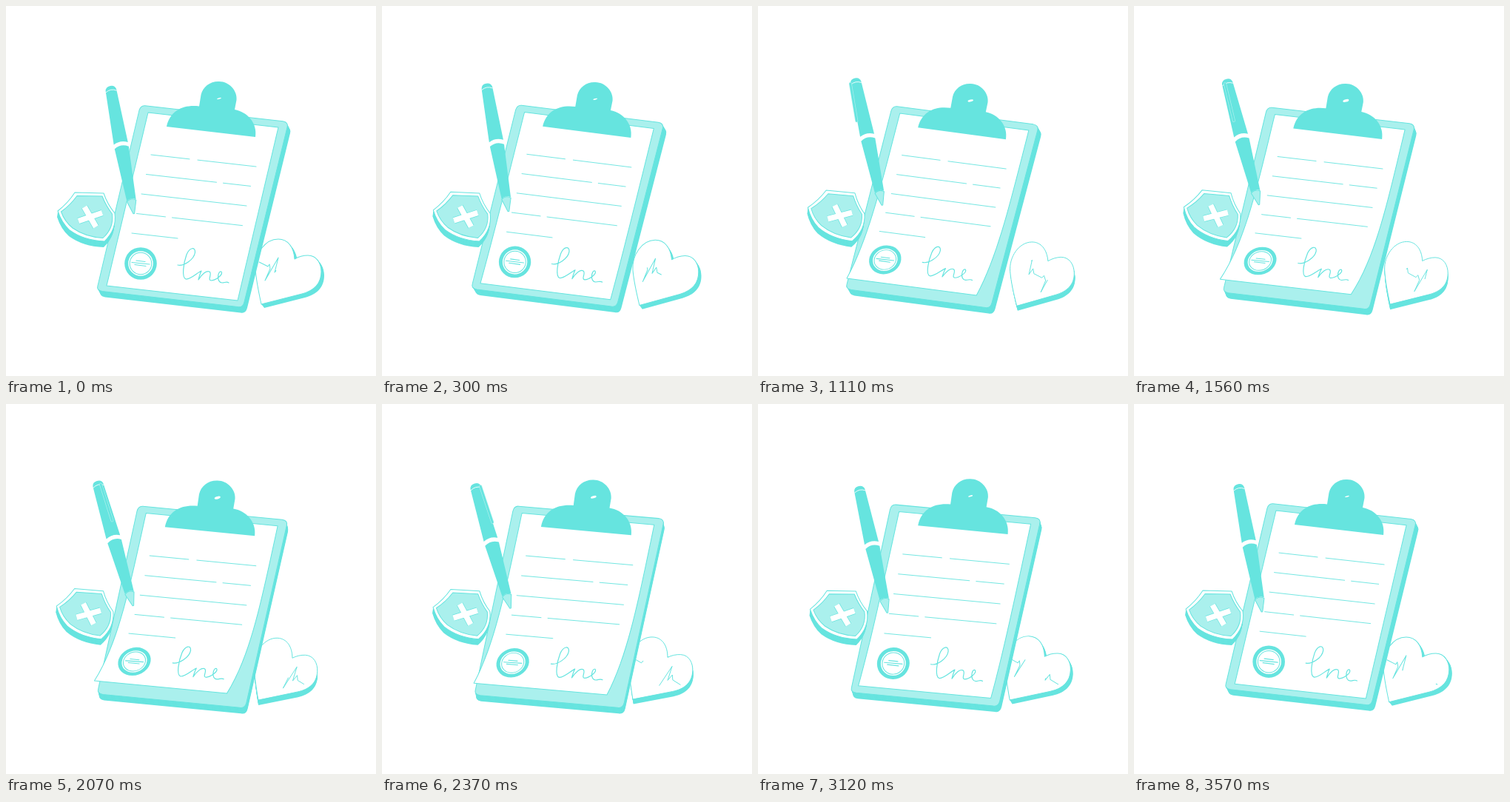
An HTML page with a canvas for the animation above (3.6 s loop, 500x500 px).

```html
<!DOCTYPE html>
<html lang="en">
<head>
<meta charset="utf-8">
<title>Medical form</title>
<style>
  html, body { margin: 0; width: 100%; height: 100%; overflow: hidden; background: #fff; }
  canvas { display: block; width: 500px; height: 500px; }
</style>
</head>
<body>
<canvas id="stage" width="500" height="500"></canvas>
<script>
const ctx = document.getElementById('stage').getContext('2d');
const DARK = '#66e4df', LIGHT = '#aaf0ed', WHITE = '#fff';
const PERIOD = 3600, RAD = Math.PI / 180;
const TRACE = 242; // length of the heartbeat path
const BEAT = 'l-7 16 18-31-5 20 6-8 1 7 11 6';

const ART = {
  heart: 'M345 403C341 385 338 370 337 355C336 335 350 315 368 315C381 315 389 326 390 342C395 339 402 337 408 337C420 337 426 348 426 359C426 376 415 385 400 389Z',
  trace: `M342 346l12 6 2-3 1 6${BEAT}l3-3 2 7${BEAT}`,
  shield: 'M93 252L132 253Q137 268 147 280Q150 302 133 318Q105 317 86 303Q75 293 70 277Q84 266 93 252Z',
  shieldInner: 'M96 256.5L130 257Q135 270 143.5 281Q146 300 131 313.5Q107 312 90 300Q79 291 74.5 278Q87 269 96 256.5Z',
  cross: 'M106 271.5L121.5 298.5M98 290.5L130 279.5',
  board: 'M188 134.7L374 155.7Q382 157 380 164L322 400Q320 408 313 406.5L130 385.5Q122 384 124 378L180 141Q182 134 188 134.7Z',
  sign: 'M232 350C240 352 254 343 255.5 333C256 325 248 326 244 336C240 347 237 367 243 369C249 370 259 360 264 358C262 362 261 366 260 370C265 362 271 357 275 359C279 362 272 370 277 371C283 371 294 363 291 359C286 357 284 374 292 374C296 374 298 372 301 374',
  sealLines: 'M176 344l12 1.5M170 346.5l24 2.5M174 349.5l15 2',
  clip: 'M217 163C222 140 241 133 261 135.5L263.5 120C266 109 276 101.5 288 102C302 102 313 115 311.5 127L309 140C326 143 340 158 337 177Z',
  cap: 'M-7.4 5Q-6.5-1 0-1Q6.5-1 7.4 5L9.7 78Q0 73-9.7 78Z',
  grip: 'M-9.7 84Q0 78 9.7 84L6.3 156Q0 152-6.3 156Z',
  nib: 'M-6.3 157Q0 152 6.3 157L.8 174.5-.8 174.5Z',
  capSeam: 'M-7.2 6.5Q0 2 7.2 6.5'
};
for (const key in ART) ART[key] = new Path2D(ART[key]);

// Written lines as dash, gap, dash.
const ROWS = [[52, 11, 79], [95, 9, 37], [142], [39, 9, 95], [62]];

// How each part sways: pivot, then [amplitude, peak in degrees] of every movement.
const SWAY = {
  board:  { pivot: [182, 134], x: [2.1, 55],  y: [2.1, 220], turn: [1.4, 82],   grow: [0.012, 260] },
  heart:  { pivot: [368, 315], x: [2, 90],    y: [2.7, 118], turn: [2.8, 253],  grow: [0.02, 0] },
  shield: { pivot: [113, 285], x: [2, -40],   y: [1, -30],   turn: [2.5, 145],  grow: [0, 0] },
  pen:    { pivot: [173, 281], x: [3.6, -69], y: [7, -40],   turn: [-3.2, 217], grow: [0, 0] }
};

function sway({ pivot: [px, py], x, y, turn, grow }, angle) {
  const wave = ([amp, peak]) => amp * (Math.cos(angle - peak * RAD) - Math.cos(peak * RAD));
  return new DOMMatrix()
    .translate(px + wave(x), py + wave(y))
    .rotate(wave(turn))
    .scale(1 + wave(grow))
    .translate(-px, -py);
}

function paint(path, fill, stroke, width = 1) {
  if (fill) { ctx.fillStyle = fill; ctx.fill(path); }
  if (stroke) { ctx.strokeStyle = stroke; ctx.lineWidth = width; ctx.stroke(path); }
}

function extrude(path, matrix, dx, dy, face) {
  for (let k = 8; k >= 0; k--) {
    ctx.setTransform(new DOMMatrix().translate(dx * k / 8, dy * k / 8).multiply(matrix));
    paint(path, k ? DARK : face, k ? null : DARK);
  }
}

function ellipse(x, y, rx, ry = rx, tilt = 0) {
  const p = new Path2D();
  p.ellipse(x, y, rx, ry, tilt, 0, 7);
  return p;
}

function drawHeart(angle) {
  const c = Math.cos(angle);
  extrude(ART.heart, sway(SWAY.heart, angle), 2 + 2 * c, 6.2 - 1.2 * c, WHITE);
  ctx.setLineDash([100, TRACE - 100]);
  ctx.lineDashOffset = -TRACE * angle / (2 * Math.PI);
  paint(ART.trace, null, DARK);
  ctx.setLineDash([]);
}

function drawBoard(angle) {
  const matrix = sway(SWAY.board, angle);
  const curl = (1 - Math.cos(angle)) / 2;
  extrude(ART.board, matrix, 3.2 + 1.85 * Math.cos(angle - 65 * RAD), 8, LIGHT);

  // The sheet lifts more and more towards its lower edge.
  const bend = (x, y) => {
    const v = (176 * (y - 144) - 20 * (x - 192)) / 42304;
    const lift = curl * v ** 4;
    return [x - 18 * lift, y - 11.5 * lift];
  };
  const sheet = new Path2D();
  for (let i = 0; i <= 20; i++) sheet.lineTo(...bend(192 - 2.8 * i, 144 + 11.7 * i));
  for (let i = 20; i >= 0; i--) sheet.lineTo(...bend(368 - 2.75 * i, 164 + 11.7 * i));
  sheet.closePath();
  paint(sheet, WHITE, DARK);

  const writing = new Path2D();
  ROWS.forEach((row, r) => {
    let x = 196 - 6.5 * r;
    const point = () => bend(x, 201 + 26.5 * r + 0.113 * (x - 196 + 6.5 * r));
    row.forEach((length, i) => {
      if (i % 2 === 0) writing.moveTo(...point());
      x += length;
      if (i % 2 === 0) writing.lineTo(...point());
    });
  });
  paint(writing, null, DARK, 0.9);

  // Fixes a drawing to the sheet and foreshortens it as the sheet lifts.
  const pin = (x, y, amount) => {
    const s = amount * curl;
    ctx.setTransform(matrix.translate(...bend(x, y))
      .multiply(new DOMMatrix([1, 0, -s, 1 - s, 0, 0])).translate(-x, -y));
  };
  pin(266, 350, 0.05);
  paint(ART.sign, null, DARK, 1.2);
  pin(182, 348, 0.14);
  paint(ellipse(182, 348, 21.8), DARK);
  paint(ellipse(182, 348, 16.8), WHITE);
  paint(ellipse(182, 348, 14.8), null, DARK);
  paint(ART.sealLines, null, DARK, 1.2);

  ctx.setTransform(matrix);
  paint(ART.clip, DARK);
  paint(ellipse(288, 125, 3 + 1.2 * curl, 0.8 + curl, -0.25), WHITE);
}

function drawShield(angle) {
  extrude(ART.shield, sway(SWAY.shield, angle), -1, 8, WHITE);
  paint(ART.shieldInner, LIGHT, DARK);
  ctx.lineCap = 'butt';
  paint(ART.cross, null, DARK, 9);
  paint(ART.cross, null, WHITE, 7.6);
  ctx.lineCap = 'round';
}

function drawPen(angle) {
  ctx.setTransform(sway(SWAY.pen, angle).translate(141, 109).rotate(-10.5));

  // The pocket clip circles the barrel once per loop.
  const side = -Math.sin(angle), inFront = Math.cos(angle) < 0.1;
  const strip = new Path2D();
  strip.moveTo(side * 8, 5);
  strip.lineTo(side * 10.5, 56);
  const drawStrip = () => {
    paint(strip, null, LIGHT, 4);
    paint(strip, null, DARK, 2.6);
  };

  if (!inFront && Math.abs(side) > 0.8) drawStrip();
  paint(ellipse(0, 80, 8), WHITE);
  paint(ART.cap, DARK);
  paint(ART.grip, DARK);
  paint(ART.nib, LIGHT, DARK);
  paint(ART.capSeam, null, WHITE, 0.8);
  if (inFront) drawStrip();
}

function draw(now) {
  const angle = now % PERIOD / PERIOD * 2 * Math.PI;
  ctx.resetTransform();
  ctx.fillStyle = WHITE;
  ctx.fillRect(0, 0, 500, 500);
  ctx.lineCap = ctx.lineJoin = 'round';
  drawHeart(angle);
  drawBoard(angle);
  drawShield(angle);
  drawPen(angle);
}

const start = performance.now();
function tick() {
  draw(performance.now() - start);
  requestAnimationFrame(tick);
}
tick();
</script>
</body>
</html>
```
